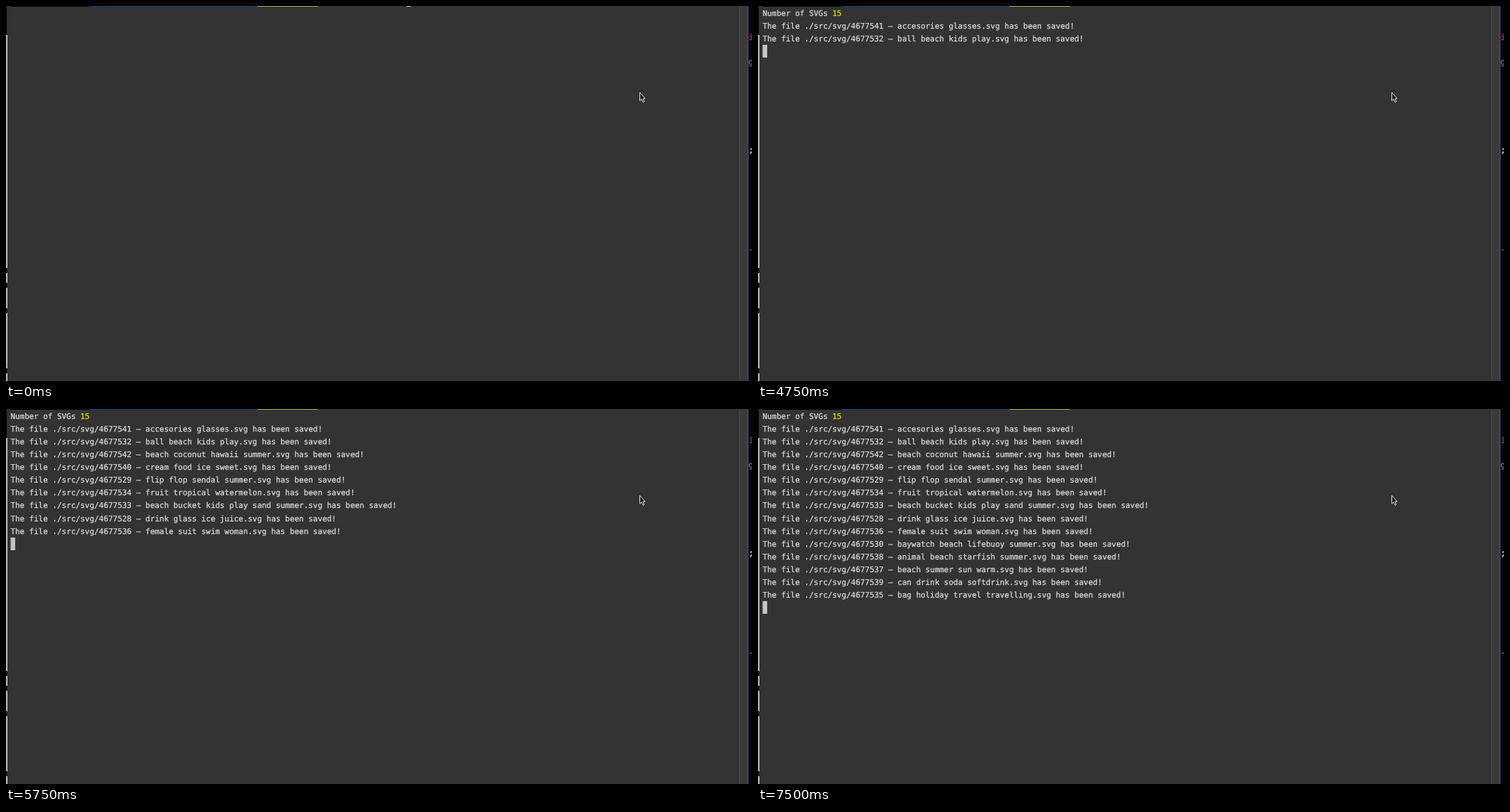
Recreate the animation shown at these times as an HTML page with a canvas. Size 1054 by 531 pixels, loop 8000 ms.

```html
<!DOCTYPE html>
<html lang="en">
<head>
<meta charset="utf-8">
<title>Terminal</title>
<style>
  html, body { margin: 0; height: 100%; overflow: hidden; background: #333; }
  canvas { display: block; }
</style>
</head>
<body>
<canvas id="stage" width="1054" height="531"></canvas>
<script>
const ctx = document.getElementById('stage').getContext('2d');
const W = 1054, H = 531, LOOP = 8000, LEFT = 6.4;
const MONO = '"DejaVu Sans Mono", monospace';
const pointer = new Path2D('M895.5 122.5v11.5l2.5-2.2 2 4.5 1.8-.8-1.9-4.4h3.1z');

// Lines printed at each moment (ms); before the first the prompt is still in view
const log = {
  500: [],
  2250: ['Number of SVGs '],
  4750: ['4677541 – accesories glasses', '4677532 – ball beach kids play'],
  5000: ['4677542 – beach coconut hawaii summer'],
  5250: ['4677540 – cream food ice sweet'],
  5500: ['4677529 – flip flop sendal summer'],
  5750: [
    '4677534 – fruit tropical watermelon',
    '4677533 – beach bucket kids play sand summer',
    '4677528 – drink glass ice juice',
    '4677536 – female suit swim woman'
  ],
  6250: ['4677530 – baywatch beach lifebuoy summer', '4677538 – animal beach starfish summer'],
  7000: ['4677537 – beach summer sun warm'],
  7250: ['4677539 – can drink soda softdrink'],
  7500: ['4677535 – bag holiday travel travelling']
};

const rowTop = row => Math.round(1 + row * 18.07);

function rect(color, x, y, w, h) {
  ctx.fillStyle = color;
  ctx.fillRect(x, y, w, h);
}

function text(str, x, y, color = '#d6d6d6', size = 10.93) {
  ctx.font = `${size}px ${MONO}`;
  ctx.fillStyle = ctx.strokeStyle = color;
  ctx.lineWidth = 0.3;
  ctx.fillText(str, x, y);
  ctx.strokeText(str, x, y);
}

function drawWindow() {
  rect('#333', 0, 0, W, H);
  rect('#000', 6, 0, 112, 1);
  rect('#1437a4', 118, 0, 237, 1);
  rect('#b9b51c', 355, 0, 86, 1);

  // Slivers of the windows behind
  rect('#111', 0, 0, 2, 41);
  rect('#b4b4b4', 0, 41, 2, H);
  for (const y of [371, 392, 428, 513]) rect('#0a0a0a', 0, y, 2, 7);
  rect('#4c4c4c', 2, 0, 1, H);
  rect('#262626', 3, 0, 1, H);

  rect('#4a4a4a', 1036, 0, 1, H);
  rect('#3a3a3a', 1037, 0, 11, H);
  rect('#565656', 1048, 0, 1, H);
  rect('#03031c', 1049, 0, 5, H);
  text('i', 1049, 48, '#a0228c', 12);
  text('g', 1049, 83, '#9a4fc0', 12);
  text(';', 1049, 208, '#d0d0d0', 12);
  rect('#7a48a8', 1050, 345, 4, 1);
}

function drawLine(line, row) {
  const y = rowTop(row) + 13;
  if (row) {
    text(`The file ./src/svg/${line}.svg has been saved!`, LEFT, y);
  } else {
    text(line, LEFT, y);
    text('15', LEFT + ctx.measureText(line).width, y, '#d8d60c');
  }
}

function drawPointer() {
  ctx.fillStyle = '#111';
  ctx.strokeStyle = '#e8e8e8';
  ctx.lineWidth = 1;
  ctx.fill(pointer);
  ctx.stroke(pointer);
}

function draw(t) {
  drawWindow();
  const printed = Object.keys(log).filter(time => t >= time);
  if (printed.length) {
    const lines = printed.flatMap(time => log[time]);
    lines.forEach(drawLine);
    rect('#c4c4c4', 6.5, rowTop(lines.length), 6.5, 18);
  } else {
    rect('#c4c4c4', 566, 0, 6, 1);
  }
  drawPointer();
}

ctx.textRendering = 'geometricPrecision';
const begin = performance.now();
function tick() {
  draw((performance.now() - begin) % LOOP);
  requestAnimationFrame(tick);
}
tick();
</script>
</body>
</html>
```
